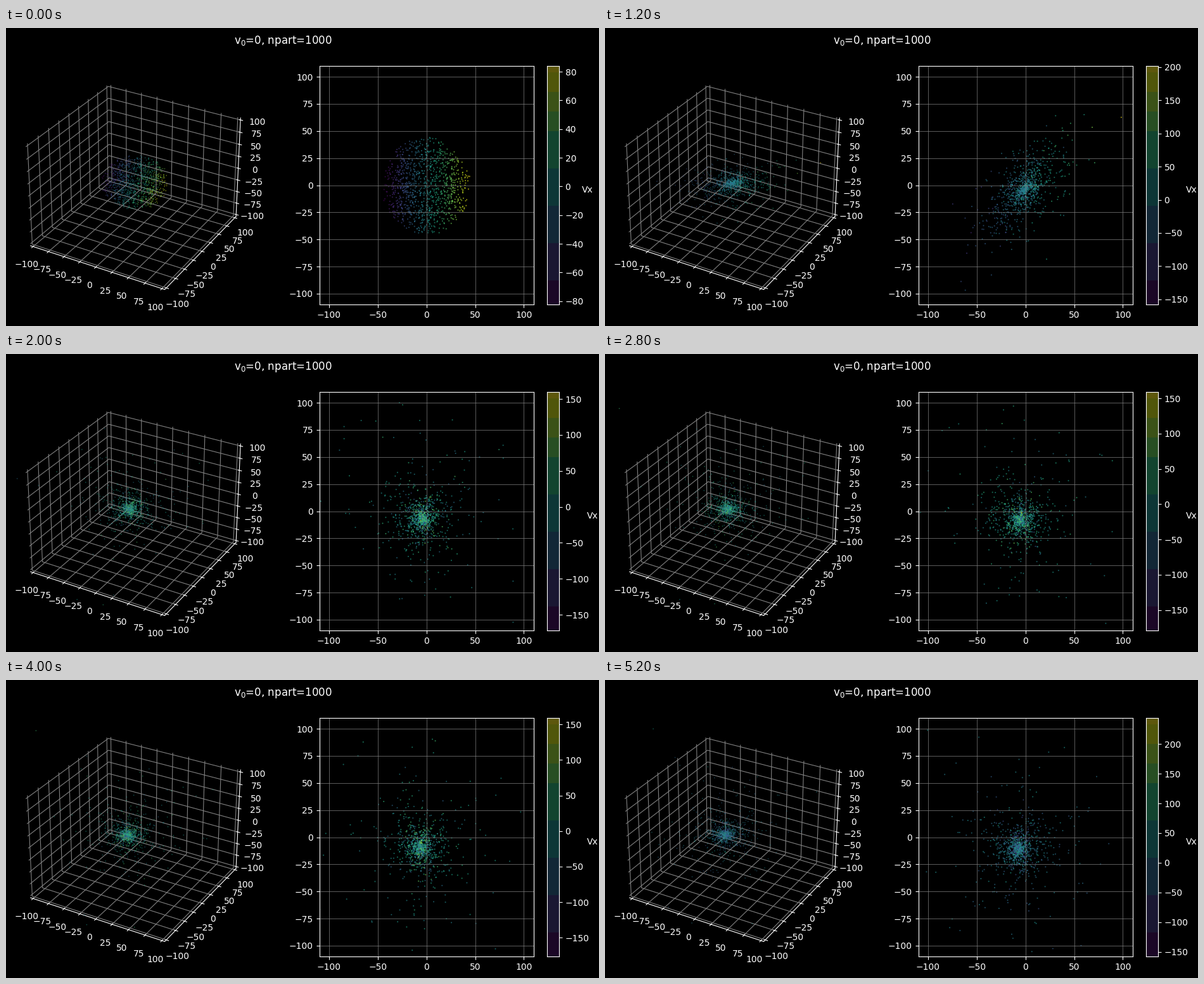
These frames come from a looping animation (936 by 471 pixels, 5400 ms). A matplotlib script:

```python
import numpy as np
import matplotlib.pyplot as plt
from matplotlib.animation import FuncAnimation
from matplotlib.patches import Rectangle

W, H, DPI = 936, 471, 100
FRAMES, INTERVAL = 27, 200
N = 1000

plt.rcParams.update({
    "font.family": "DejaVu Sans",
    "figure.facecolor": "black", "axes.facecolor": "black",
    "axes.edgecolor": "white", "axes.labelcolor": "white",
    "text.color": "white", "xtick.color": "white", "ytick.color": "white",
    "grid.color": "gray", "grid.linewidth": 0.8,
})
for name in "xyz":
    plt.rcParams[f"axes3d.{name}axis.panecolor"] = (0, 0, 0, 0)

rng = np.random.default_rng(7)
cmap = plt.get_cmap("viridis")


def unit(v):
    return v / np.linalg.norm(v, axis=1, keepdims=True)


def by_side(p):
    return p[np.argsort(p[:, 0] + 0.5 * p[:, 1])]


def smooth(x):
    x = np.clip(x, 0, 1)
    return x * x * (3 - 2 * x)


def bump(t, mid, width):
    return np.exp(-((t - mid) / width) ** 2)


# Uniform ball that starts by expanding
ball = by_side(unit(rng.normal(size=(N, 3))) * 46 * rng.random((N, 1)) ** 0.3)

# Collapse into a dense core with sheared arms
spread = rng.normal(size=(N, 3)) * 34 * rng.random((N, 1))
spread[:, 1] = 0.8 * spread[:, 1] + 0.6 * spread[:, 0]
arms = by_side(spread * [0.9, 0.9, 0.7] + [-1, -4, 0])
arms_vx = 1.4 * arms[:, 0] + rng.normal(0, 28, N)

# Bound orbits with a heavy-tailed radius
radius = 17 * np.exp(rng.normal(0, 0.97, N))
speed = (40 + 75 / (1 + radius / 20)) * rng.uniform(0.4, 1.6, N)
phase = rng.uniform(0, 2 * np.pi, N)
e1 = unit(rng.normal(size=(N, 3)))
e2 = unit(np.cross(e1, rng.normal(size=(N, 3))))


def particles(t):
    """Positions and x velocities at step t."""
    k = t / (FRAMES - 1)
    centre = np.array([-3 - 4 * k, -4 - 7 * k, 3 * k])
    a = phase + speed / (10 * radius) * t
    cos, sin = np.cos(a)[:, None], np.sin(a)[:, None]
    orbit = centre + radius[:, None] * (e1 * cos + 0.8 * e2 * sin)
    orbit_vx = speed * (0.8 * e2 * cos - e1 * sin)[:, 0]

    fall, spin = smooth(t / 6), smooth((t - 6) / 4)
    pos = ball * (1 + 0.185 * t) * (1 - fall) + arms * fall
    vx = 1.85 * ball[:, 0] * (1 - fall) + arms_vx * fall
    return pos * (1 - spin) + orbit * spin, vx * (1 - spin) + orbit_vx * spin


def vx_range(t):
    """Scale limits: a quick rise, then peaks at the collapse and the end."""
    start = np.exp(-t)
    low = -180 + 0.22 * (t - 16) ** 2 + 41.3 * start
    high = 159 - 75 * start + 43 * bump(t, 6, 2) + 85 * bump(t, 26, 1.7)
    return low, high


def rect(left, top, right, bottom):
    return [left / W, 1 - bottom / H, (right - left) / W, (bottom - top) / H]


TOP, BOTTOM = 60, 437.1
fig = plt.figure(figsize=(W / DPI, H / DPI), dpi=DPI)
fig.suptitle("v$_0$=0, npart=1000", x=437.4 / W, y=1 - 10.3 / H, fontsize=12)

# 3D view
mid, half = 198.8, (BOTTOM - TOP) / 2
space = fig.add_axes(rect(mid - half, TOP, mid + half, BOTTOM), projection="3d")
space.view_init(30, -60)
lim = (-100 * 25 / 24, 100 * 25 / 24)
ticks = np.arange(-100, 101, 25)
space.set(xlim=lim, ylim=lim, zlim=lim, xticks=ticks, yticks=ticks, zticks=ticks)

# Plane view
plane = fig.add_axes(rect(494.65, TOP, 832.83, BOTTOM))
plane.set(xlim=(-110, 110), ylim=(-110, 110))
plane.grid(True, linewidth=0.5)
dots = plane.scatter(ball[:, 0], ball[:, 1], c=ball[:, 0], s=2.3,
                     linewidths=0, alpha=0.62, cmap=cmap)

# Colour scale in flat bands, finer towards the top
bar = fig.add_axes(rect(854, TOP, 872.9, BOTTOM))
bar.set(xlim=(0, 1), xticks=[])
bar.yaxis.tick_right()
bar.yaxis.set_label_position("right")
bar.set_ylabel("Vx", rotation=0)
edges = np.r_[0, np.linspace(0.1, 0.727, 5), np.linspace(0.809, 0.973, 3), 1]
for a, b in zip(edges, edges[1:]):
    tone = np.array(cmap((a + b) / 2)[:3]) * 0.38
    bar.add_patch(Rectangle((0, a), 1, b - a, transform=bar.transAxes,
                            facecolor=tone, linewidth=0, antialiased=False))

cloud = None


def draw(i):
    global cloud
    pos, vx = particles(i)
    low, high = vx_range(i)
    dots.set_offsets(pos[:, :2])
    dots.set_array(vx)
    dots.set_clim(low, high)
    if cloud is not None:
        cloud.remove()
    cloud = space.scatter(*pos.T, c=vx, s=1.6, linewidths=0, alpha=0.48,
                          cmap=cmap, vmin=low, vmax=high)
    bar.set_ylim(low, high)
    return dots, cloud


anim = FuncAnimation(fig, draw, frames=FRAMES, interval=INTERVAL,
                     repeat=True, repeat_delay=0, blit=False)
plt.show()
```
